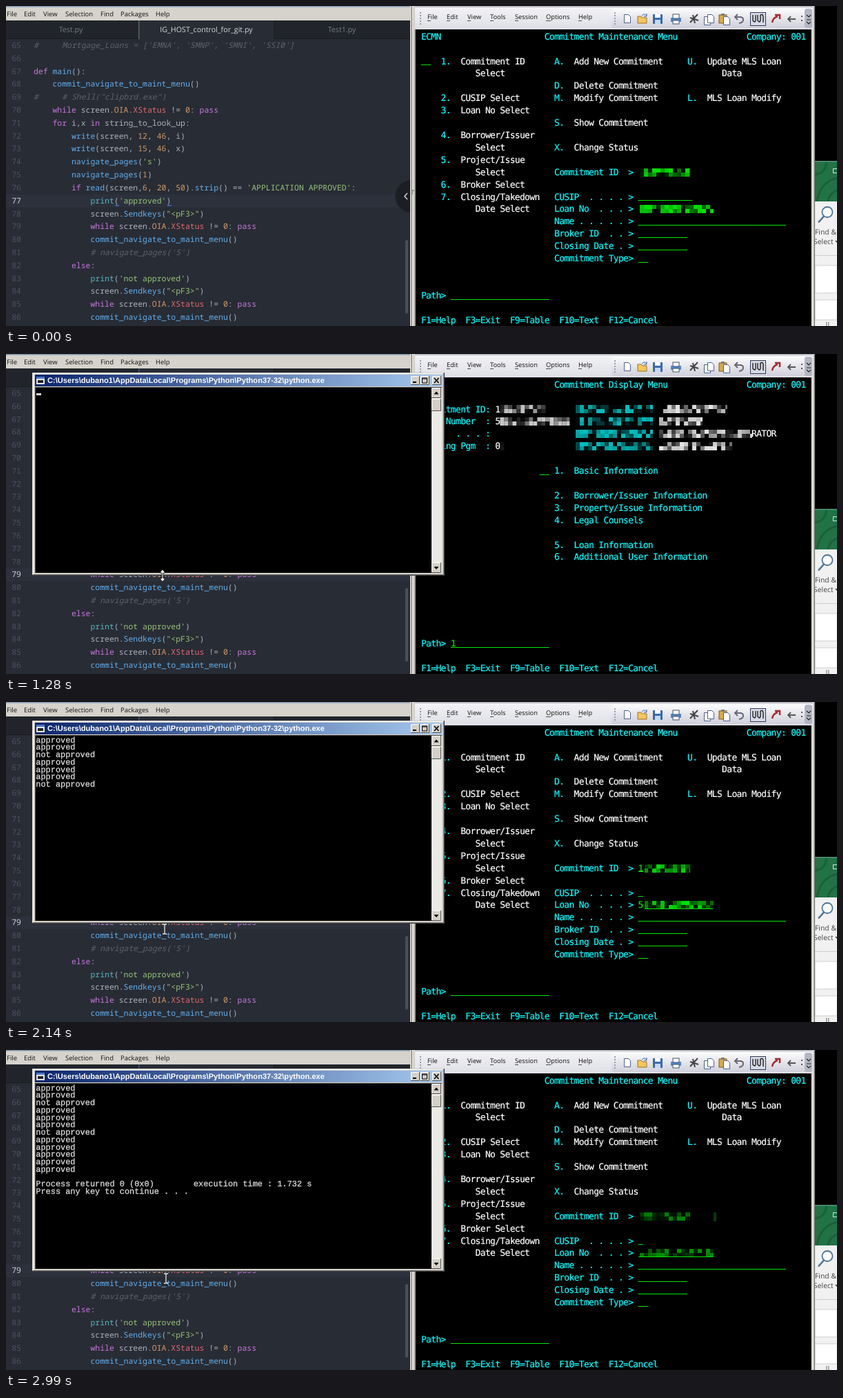
Recreate the animation shown at these times as an HTML page. Size 1205 by 465 pixels, loop 5820 ms.

```html
<!DOCTYPE html>
<html lang="en">
<head>
<meta charset="utf-8">
<title>Terminal automation</title>
<style>
html, body { margin: 0; width: 100%; height: 100%; overflow: hidden; background: #000; }
svg { display: block; width: 100vw; height: 100vh; }
text { white-space: pre; text-rendering: geometricPrecision; }
.code { font: 11.46px "Noto Sans Mono", monospace; fill: #abb2bf; }
.ui { font: 9.5px "Open Sans", sans-serif; fill: #111; }
.tab { font: 10.7px "Open Sans", sans-serif; text-anchor: middle; }
.term { font: 13px "DejaVu Sans Mono", monospace; letter-spacing: -.677px; }
.con { font: 11.92px "Liberation Mono", monospace; fill: #dcdcdc; stroke: #dcdcdc; stroke-width: .3; }
.cap { font: bold 11.1px "Liberation Sans", sans-serif; fill: #fff; }
</style>
</head>
<body>
<svg id="stage" viewBox="0 0 1205 465" preserveAspectRatio="none"></svg>
<script>
const LOOP = 5820, PITCH = 18.81;
const CYAN = '#00ffff', WHITE = '#ffffff', GREEN = '#00e800', FACE = '#d4d0c8';

const esc = s => s.replace(/&/g, '&amp;').replace(/</g, '&lt;').replace(/>/g, '&gt;');
const rect = (x, y, w, h, fill, more = '') =>
  `<rect x="${x}" y="${y}" width="${w}" height="${h}" fill="${fill}" ${more}/>`;
const path = (d, stroke, width = 1, fill = 'none') =>
  `<path d="${d}" stroke="${stroke}" stroke-width="${width}" fill="${fill}"/>`;
const label = (x, y, s, cls, more = '') =>
  `<text x="${x}" y="${y}" class="${cls}" ${more}>${esc(s)}</text>`;
const bevel = (x, y, w, h) =>
  rect(x, y, w, h, FACE) + path(`M${x + .5} ${y + h}V${y + .5}H${x + w}`, '#fff') +
  path(`M${x + w - .5} ${y}V${y + h - .5}H${x}`, '#555');

function random(seed) {
  let a = seed * 7919 + 17;
  return () => (a = (a * 16807 + 11) % 2147483647) / 2147483647;
}

/* ---------- editor ---------- */
const CODE = `#     Mortgage_Loans = ['EMNA', 'SMNP', 'SMNI', 'SSI0']

def main():
    commit_navigate_to_maint_menu()
#     # Shell("clipbrd.exe")
    while screen.OIA.XStatus != 0: pass
    for i,x in string_to_look_up:
        write(screen, 12, 46, i)
        write(screen, 15, 46, x)
        navigate_pages('s')
        navigate_pages(1)
        if read(screen,6, 20, 50).strip() == 'APPLICATION APPROVED':
            print('approved')
            screen.Sendkeys("<pF3>")
            while screen.OIA.XStatus != 0: pass
            commit_navigate_to_maint_menu()
            # navigate_pages('5')
        else:
            print('not approved')
            screen.Sendkeys("<pF3>")
            while screen.OIA.XStatus != 0: pass
            commit_navigate_to_maint_menu()`.split('\n');

const TOKEN = /(#.*)|('[^']*'|"[^"]*")|\b(def|while|for|in|if|else|pass)\b|\b(print)\b|(\w+)(?=\()|\b(OIA|\d+)\b|(XStatus)/g;
const HUES = ['#5c6370', '#98c379', '#c678dd', '#56b6c2', '#61afef', '#d19a66', '#e06c75'];

function paint(line) {
  let out = '', last = 0;
  for (const m of line.matchAll(TOKEN)) {
    const kind = m.slice(1).findIndex(Boolean);
    out += esc(line.slice(last, m.index)) +
      `<tspan fill="${HUES[kind]}"${kind ? '' : ' font-style="italic"'}>${esc(m[0])}</tspan>`;
    last = m.index + m[0].length;
  }
  return out + esc(line.slice(last));
}

const lineY = n => 61 + (n - 65) * PITCH;
const number = (n, fill) => label(22, lineY(n), String(n), 'code', `text-anchor="end" style="fill:${fill}"`);

function editorBack() {
  const menu = [[1, 'File'], [26, 'Edit'], [54, 'View'], [86, 'Selection'], [137, 'Find'], [166, 'Packages'], [217, 'Help']];
  return rect(0, 0, 586, 465, '#282c34') + rect(0, 0, 586, 21, '#d6d3cc') + rect(0, 0, 586, 1.5, '#7f98b4') +
    menu.map(([x, s]) => label(x, 15.3, s, 'ui')).join('') +
    rect(0, 21, 586, 27, '#21252b') + rect(192, 21, 197, 27, '#282c34') +
    rect(0, 47, 192, 1, '#181a1f') + rect(389, 47, 197, 1, '#181a1f') + rect(388.5, 21, 1, 27, '#181a1f') +
    [[94, 'Test.py', '#747b88'], [290.5, 'IG_HOST_control_for_git.py', '#d7dae0'], [487, 'Test1.py', '#747b88']]
      .map(([x, s, c]) => label(x, 38, s, 'tab', `fill="${c}"`)).join('');
}

const editorText = () => CODE.map((s, i) =>
  number(65 + i, '#4b5263') + `<text x="40" y="${lineY(65 + i)}" class="code">${paint(s)}</text>`).join('') +
  rect(579, 340, 4, 107, '#4a505c', 'rx="2"');

/* ---------- window frames, toolbar, spreadsheet edge ---------- */
function toolbar() {
  const menu = [[611, 'File'], [639, 'Edit'], [669, 'View'], [702, 'Tools'], [738, 'Session'], [783, 'Options'], [830, 'Help']];
  const page = (x, y) => path(`M${x} ${y}h6l3 3v9h-9z`, '#4a5f8c', 1, '#fff');
  const dots = x => [9, 13, 17, 21, 25].map(y => rect(x, y, 2, 2, '#9a9aa6')).join('');
  return rect(593, 0, 577, 34, 'url(#bar)') + rect(593, 0, 577, 2, '#b9bcc6') +
    rect(878, 4, 291, 28, 'url(#tool)', 'rx="4"') + rect(1158, 4, 11, 28, '#b4b6c2', 'rx="3"') +
    dots(600) + dots(882) +
    menu.map(([x, s]) => label(x, 19, s, 'ui', 'style="font-size:9.3px"') +
      rect(x, 21, s === 'Options' ? 7 : 5, .8, '#222')).join('') +
    page(896.5, 12.5) +
    path('M916 25v-10h5l2 2h6v8z', '#9b7427', 1, '#f2c75c') + path('M922 14q4-4 7 0m0-3v4h-4', '#3c65a8') +
    rect(938, 12, 14, 14, '#3868b4', 'rx="1"') + rect(941, 12, 8, 5, '#fff') + rect(941, 20, 8, 6, '#c8d8f0') +
    rect(964, 17, 15, 6, '#5588cc') + rect(967, 12, 9, 6, '#fff', 'stroke="#456"') + rect(967, 21, 9, 5, '#fff', 'stroke="#456"') +
    path('M992 24l11-12M992 17l12 4M996 13l3 12', '#444', 2) +
    page(1012.5, 15.5) + page(1017.5, 12.5) +
    rect(1034, 13, 11, 12, '#d9a94a', 'stroke="#7b5d22"') + rect(1037, 11, 5, 3, '#777') + page(1040.5, 15.5) +
    path('M1058 16h6q5 0 5 4t-6 5M1061 12l-4 4 4 4', '#667', 2) +
    rect(1079.5, 9.5, 22, 19, '#d6dae6', 'stroke="#333a55"') +
    path('M1083 13v8q3 4 4 0v-8M1090 13v8q3 4 4 0v-8q3-2 4 2v9', '#222', 1.4) +
    path('M1111 24q1-7 8-9M1115 13h7v6', '#a8242a', 2.4) +
    path('M1145 19h-11m4-4l-4 4 4 4', '#555', 1.8) +
    rect(1153, 14, 2, 2, '#555') + rect(1153, 20, 2, 2, '#555') +
    path('M1161 13l3 3 3-3M1161 20h6M1161 23l3 3 3-3', '#222', 1.2);
}

function frames() {
  return rect(586, 0, 8, 465, FACE) + rect(588, 0, 1, 465, '#6c6a66') + rect(589, 0, 1, 465, '#fff') +
    rect(592.5, 34, 1.5, 431, '#8a8882') + path('M592 268h-3v6', '#666') +
    rect(1168, 0, 5, 465, FACE) + rect(1168, 34, 1, 431, '#fff') + rect(1172, 0, 1.2, 465, '#666');
}

function sheet() {
  return '<g clip-path="url(#side)">' + rect(1173, 225, 32, 59, '#217346') +
    path('M1173 245q16-2 17-20M1176 284q4-28 29-34M1192 284q2-12 13-16', '#1a6039', 3) +
    rect(1173, 225, 32, 1.5, '#57937a') + rect(1199.5, 236.5, 7, 6, 'none', 'stroke="#cfe3d8"') +
    rect(1173, 284, 32, 181, '#f1f1f1') +
    '<circle cx="1191" cy="299.5" r="7.5" fill="#fff" stroke="#4a7496" stroke-width="1.8"/>' +
    path('M1186 305.5l-8 9', '#4a7496', 2.6) +
    label(1173, 332, 'Find &', 'ui', 'style="font-size:10.4px;fill:#444"') +
    label(1171, 346, 'Select', 'ui', 'style="font-size:10.4px;fill:#444"') +
    path('M1202 341h5l-2.5 3z', 'none', 0, '#555') +
    rect(1173, 362, 32, 1, '#cfcfcf') + rect(1173, 377, 32, 40, '#fff', 'stroke="#d0d0d0"') +
    rect(1173, 427, 32, 29, '#fff', 'stroke="#d0d0d0"') + rect(1189, 459, 1.5, 6, '#999') + rect(1192, 459, 1.5, 6, '#999') + '</g>';
}

/* ---------- terminal ---------- */
const colX = c => 594.8 + 7.15 * c, rowY = r => 44 + 17.91 * r;
const cell = ([r, c, s, fill = CYAN]) =>
  label(colX(c), rowY(r) + 4.7, s, 'term', `fill="${fill}" stroke="${fill}" stroke-width=".2"`);
const rule = (r, c, n) => rect(colX(c), Math.round(rowY(r) + 5.4), (7.15 * n).toFixed(1), 1, GREEN);

const FIXED = [[0, 67, 'Company: 001'], [21, 1, 'Path>'], [23, 1, 'F1=Help  F3=Exit  F9=Table  F10=Text  F12=Cancel']];

const option = (r, c, key, ...names) =>
  [[r, c, key + '.'], ...names.map((s, i) => [r + i, c + 4 + 3 * i, s, WHITE])];
const MAINT = [
  [0, 1, 'ECMN'], [0, 26, 'Commitment Maintenance Menu'],
  ...option(2, 5, 1, 'Commitment ID', 'Select'), ...option(5, 5, 2, 'CUSIP Select'),
  ...option(6, 5, 3, 'Loan No Select'), ...option(8, 5, 4, 'Borrower/Issuer', 'Select'),
  ...option(10, 5, 5, 'Project/Issue', 'Select'), ...option(12, 5, 6, 'Broker Select'),
  ...option(13, 5, 7, 'Closing/Takedown', 'Date Select'),
  ...option(2, 28, 'A', 'Add New Commitment'), ...option(4, 28, 'D', 'Delete Commitment'),
  ...option(5, 28, 'M', 'Modify Commitment'), ...option(7, 28, 'S', 'Show Commitment'),
  ...option(9, 28, 'X', 'Change Status'), ...option(2, 55, 'U', 'Update MLS Loan', 'Data'),
  ...option(5, 55, 'L', 'MLS Loan Modify'),
  ...['Commitment ID  >', '', 'CUSIP  . . . . >', 'Loan No  . . . >', 'Name . . . . . >',
    'Broker ID  . . >', 'Closing Date . >', 'Commitment Type>'].map((s, i) => [11 + i, 28, s])
];
const HEAD = [
  [0, 28, 'Commitment Display Menu'], [2, 1, 'Commitment ID:'], [3, 1, 'Loan Number  :'],
  [4, 1, 'Name   . . . :'], [5, 1, 'Lending Pgm  :']
];
const DISPLAY = [...HEAD,
  ...[[7, 'Basic'], [9, 'Borrower/Issuer'], [10, 'Property/Issue'], [11, 'Legal Counsels'], [13, 'Loan'], [14, 'Additional User']]
    .map(([r, s], i) => [r, 28, `${i + 1}.  ${s}${i === 3 ? '' : ' Information'}`])
];

// Blurred-out value: a seeded high-contrast mosaic in one hue.
function mosaic(x, r, w, hue, seed, gain = 1) {
  const rnd = random(seed), y = Math.round(rowY(r) - 5.5);
  let out = '';
  rnd();
  for (let dx = 0; dx < w; dx += 6)
    for (const dy of [0, 6]) {
      const n = rnd(), v = n * n * (3 - 2 * n) * gain;
      out += rect(x + dx, y + dy, Math.min(6, w - dx), 6, `rgb(${hue.map(h => Math.round(h * v))})`);
    }
  return out;
}

function summary(step, mixed) {
  const pale = [255, 255, 255], teal = [0, 255, 255], tail = mixed ? 2 : 1;
  const ids = ['12', '54', '', '06'], wide = [66, 101, 0, 6];
  const names = mixed ? [120, 84, 0, 85] : [99, 63, 135, 106];
  const tags = mixed ? [90, 95, 50, 40] : [112, 112, 112, 112];
  return ids.map((s, i) => {
    const r = i + 2, seed = step * 31 + i;
    return cell([r, 16, s.slice(0, tail), WHITE]) +
      mosaic(colX(16 + tail), r, wide[i], pale, seed, .8) +
      mosaic(826, r, tags[i], teal, seed + 5, mixed ? .6 : .75) +
      mosaic(947, r, names[i], pale, seed + 9, .9);
  }).join('') + (mixed ? cell([2, 66, 'NC', WHITE]) + cell([5, 68, 'Modify', WHITE]) : cell([4, 68, 'RATOR', WHITE]));
}

function fields(step, mixed) {
  const green = [0, 240, 0], live = step >= 0, last = step > 20;
  const lead = live && !mixed && !last;
  let out = mosaic(919, 11, 73, green, step + 4, last ? .55 : .95) + mosaic(919, 14, 107, green, step + 8, last ? .6 : .95);
  if (live) out += rule(14, 45.1, 15.1);
  if (mixed || last) out += rect(1026, 236, 4, 13, '#063806');
  if (lead) out += rect(917, 234, 9, 15, '#000') + rect(917, 288, 9, 13, '#000') +
    cell([11, 45, '1', GREEN]) + cell([14, 45, '5', GREEN]) + rule(11, 45, 1);
  const cusip = !live || mixed ? 11 : step < 10 ? 2 : 1;
  return out + rule(13, 45, cusip) + rule(15, 45, 30) + rule(16, 45, 10) + rule(17, 45, 10) + rule(18, 45, 2);
}

function terminal(step) {
  const phase = step * .65 % 1;
  const mixed = phase > .22 && phase < .28;
  const shown = step === 0 || (step > 0 && step < 20 && phase > .35);
  const rows = mixed ? [...HEAD, ...MAINT.filter(c => c[0] > 5)] : shown ? DISPLAY : MAINT;
  return rect(594, 34, 574, 431, '#000') + [...FIXED, ...rows].map(cell).join('') +
    (shown || mixed ? summary(step, mixed) : rule(2, 1, 2)) +
    (shown ? rule(7, 25, 2) : fields(step, mixed)) +
    cell([21, 7, shown ? '1' : mixed ? 's' : '', GREEN]) + rule(21, 7, 20);
}

/* ---------- console ---------- */
function consoleWin(step, caret) {
  const count = step > 20 ? 12 : Math.min(12, Math.floor(Math.max(0, step) * .65));
  const lines = Array.from({ length: count }, (_, i) => i === 2 || i === 6 ? 'not approved' : 'approved');
  if (step > 20) lines.push('', 'Process returned 0 (0x0)        execution time : 1.732 s', 'Press any key to continue . . .');
  return rect(38, 27, 598, 295, FACE) + path('M39.5 321V28.5H635', '#fff') +
    path('M635.5 27V321.5H38', '#404040') + path('M634.5 28V320.5H39', '#808080') +
    rect(42, 30, 591, 17, 'url(#cap)') +
    rect(44, 33, 12, 11, '#e8e8e8') + rect(44, 33, 12, 3, '#4a7ac8') + rect(46, 38, 8, 4, '#222') +
    label(60, 42, 'C:\\Users\\dubano1\\AppData\\Local\\Programs\\Python\\Python37-32\\python.exe', 'cap') +
    bevel(587, 32, 13, 13) + bevel(601, 32, 13, 13) + bevel(618, 32, 13, 13) +
    rect(590, 40, 5, 2, '#000') + path('M603.5 35h7v7h-7zM603.5 36h7', '#000') + path('M621 35l6.5 7m0-7l-6.5 7', '#000', 1.6) +
    rect(42, 48, 590, 270, '#404040') + rect(43, 49, 574, 269, '#000') + rect(617, 49, 15, 269, '#eceae6') +
    bevel(617, 49, 14, 15) + bevel(617, 65, 14, 18) + bevel(617, 303, 14, 15) +
    path('M620.5 58.5h7l-3.5-4zM620.5 309h7l-3.5 4z', 'none', 0, '#000') +
    (caret ? rect(44, 57, 7, 3, '#d8d8d8') : '') +
    lines.map((s, i) => label(43.3, 58.7 + 10.75 * i, s, 'con')).join('');
}

/* ---------- pointer ---------- */
const beam = (x, y) => path(`M${x - 3} ${y - 7}h2l1 1 1-1h2M${x} ${y - 6}v12M${x - 3} ${y + 7}h2l1-1 1 1h2`, '#e6e6e6', 1.3);
const sizer = (x, y) => path(`M${x} ${y - 9}l4 5h-3v8h3l-4 5-4-5h3v-8h-3z`, '#000', .8, '#fff');

function pointer(t) {
  if (t < 190) return '';
  if (t < 500) {
    const u = Math.floor((t - 190) / 77.5) / 4, v = 1 - u;
    return beam(575 * v * v + 800 * u * v + 229 * u * u, 280 * v * v + 962 * u * v + 322 * u * u);
  }
  if (t < 740) return beam(229, 322);
  if (t < 1905) return sizer(227, 322);
  return t < 2290 ? beam(230, 330) : beam(232, 332);
}

/* ---------- stage ---------- */
const grad = (id, a, b, dir = 'x2="0" y2="1"') =>
  `<linearGradient id="${id}" ${dir}><stop stop-color="${a}"/><stop offset="1" stop-color="${b}"/></linearGradient>`;

document.getElementById('stage').innerHTML =
  `<defs>${grad('bar', '#f4f4f6', '#dedfe6')}${grad('tool', '#fbfbfd', '#cfd0da')}${grad('cap', '#0a246a', '#a6caf0', '')}
  <clipPath id="side"><path d="M1173 0h32v465h-32z"/></clipPath>
  <clipPath id="pane"><path d="M0 0h586v465h-586z"/></clipPath></defs>` +
  rect(0, 0, 1205, 465, '#000') + editorBack() + '<g id="mark"></g>' + editorText() +
  frames() + toolbar() + sheet() + '<g id="term"></g><g id="top"></g>';

const shown = {};
function put(id, html) {
  if (shown[id] === html) return;
  document.getElementById(id).innerHTML = shown[id] = html;
}

function focusLine(t) {
  const n = t < 495 ? 77 : 79;
  const brackets = n === 77 ? rect(158, 289.5, 6, 1, '#528bff') + rect(234, 289.5, 6, 1, '#528bff') : '';
  return rect(0, lineY(n) - 13, 586, PITCH, '#2c313c') + brackets +
    rect(192, 21, 1.5, 27, t < 190 ? '#5a616e' : t < 740 ? '#568af2' : '#3d4f78');
}

const dock = '<g clip-path="url(#pane)"><circle cx="588" cy="276.5" r="23.5" fill="#1b1e23"/>' +
  path('M582 272l-4 4.5 4 4.5', '#c8ccd4', 1.6) + '</g>';

function draw(t) {
  const step = t < 1280 ? -1 : t < 2990 ? Math.min(20, Math.floor((t - 1280) / 77.8)) : 21;
  put('mark', focusLine(t));
  put('term', terminal(step));
  put('top', number(t < 495 ? 77 : 79, '#c5cad3') + (t < 260 ? dock : '') +
    (t < 740 ? '' : consoleWin(step, t >= 1050 && step < 1)) + pointer(t));
}

const start = performance.now();
function tick() {
  draw((performance.now() - start) % LOOP);
  requestAnimationFrame(tick);
}
tick();
</script>
</body>
</html>
```
